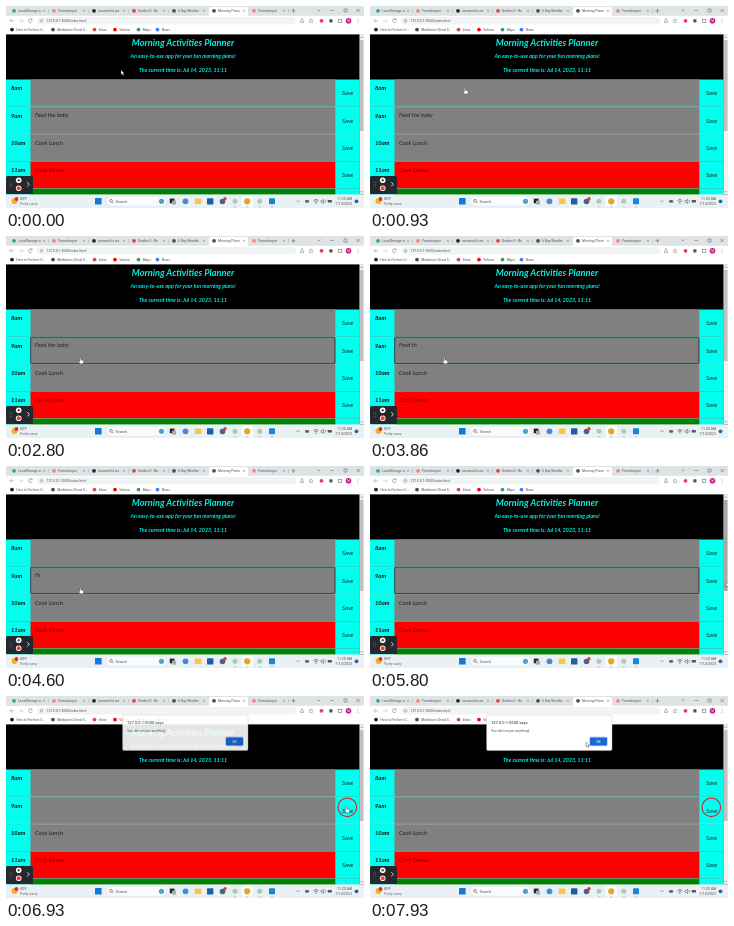
These frames come from a looping animation (358 px wide and 202 px high, 8000 ms). An HTML page:

```html
<!DOCTYPE html>
<html lang="en">
<head>
<meta charset="utf-8">
<title>Morning planner</title>
<style>
  html, body { margin: 0; width: 100%; height: 100%; overflow: hidden; background: #000; }
  svg { display: block; width: 100%; height: 100%; }
  text { font-family: Roboto, "Open Sans", sans-serif; font-size: 3.4px; fill: #555; white-space: pre; }
  .hand { font-family: Lato, sans-serif; font-style: italic; font-size: 5.8px; fill: #222; }
  .bold { font-weight: 700; fill: #111; }
  .head { font-weight: 700; fill: #00f0e2; text-anchor: middle; }
</style>
</head>
<body>
<svg id="stage" viewBox="0 0 358 202"></svg>
<script>
const NS = 'http://www.w3.org/2000/svg';
const LOOP = 8000;
const stage = document.getElementById('stage');
const CYAN = '#00ffee';
const GREY = '#808080';

function add(tag, attrs, parent = stage) {
  const el = document.createElementNS(NS, tag);
  for (const key in attrs) el.setAttribute(key, attrs[key]);
  parent.appendChild(el);
  return el;
}
const rect = (x, y, width, height, fill, more, parent) =>
  add('rect', { x, y, width, height, fill, ...more }, parent);
const dot = (cx, cy, r, fill, more, parent) =>
  add('circle', { cx, cy, r, fill, ...more }, parent);
const line = (d, stroke = '#444', width = 0.6, parent) =>
  add('path', { d, stroke, 'stroke-width': width, fill: 'none' }, parent);
function label(x, y, str, more, parent) {
  const el = add('text', { x, y, ...more }, parent);
  el.textContent = str;
  return el;
}

function drawBrowser() {
  rect(0, 0, 358, 10, '#dee3e5');
  const tabs = [
    ['LocalStorage a', '#2aa79b'], ['Framelooper', '#ff8274'],
    ['norvanel/a we', '#24292f'], ['Grades II - Bo', '#e0463e'],
    ['6 Day Weathe', '#4a4f55'], ['Morning Plann', '#4a4f55'],
    ['Framelooper', '#ff8274']
  ];
  tabs.forEach(([name, color], i) => {
    const x = 4 + i * 40;
    if (i === 5) rect(x - 1, 1, 39, 10, '#fff', { rx: 2 });
    else if (i !== 4) line(`M${x + 38.5} 3v4`, '#9aa5a8', 0.4);
    dot(x + 4, 4.8, 1.9, color);
    label(x + 8, 6, name);
    line(`M${x + 33} 3.8l1.9 1.9m0 -1.9l-1.9 1.9`, '#666', 0.45);
  });
  line('M285.5 4.8h4m-2 -2v4', '#666');
  line('M311.5 3.5l1.5 1.5l1.5 -1.5M324.5 4.5h3.5M350.5 2.8l3.4 3.4m0 -3.4l-3.4 3.4', '#555', 0.5);
  line('M338 3h3v3h-3z', '#555', 0.5);

  rect(0, 9.8, 358, 19, '#fff');
  line('M8 14.8h-4l1.6 -1.7m-1.6 1.7l1.6 1.7', '#888', 0.5);
  line('M13 14.8h4l-1.6 -1.7m1.6 1.7l-1.6 1.7', '#bbb', 0.5);
  line('M26 13.6a1.9 1.9 0 1 0 .2 1.8m-.1 -2.8v1.3h-1.4', '#666', 0.5);
  rect(31, 11, 259, 7.6, '#f1f3f4', { rx: 3.8 });
  dot(35.5, 14.8, 1.3, 'none', { stroke: '#666', 'stroke-width': 0.5 });
  label(40.5, 16, '127.0.0.1:5500/index.html');
  line('M294.5 14.5v2h3v-2m-1.5 1v-3m-1 1l1 -1l1 1', '#666', 0.45);
  line('M305 12.8l.6 1.3l1.5 .2l-1.1 1l.3 1.5l-1.3 -.7l-1.3 .7l.3 -1.5l-1.1 -1l1.5 -.2z', '#666', 0.4);
  dot(315.5, 14.8, 1.9, '#e8404f');
  rect(323.3, 13.2, 3.2, 3.2, '#555', { rx: 0.6 });
  rect(332.5, 13.2, 3.4, 3.2, 'none', { stroke: '#555', 'stroke-width': 0.5 });
  dot(342.5, 14.8, 2.8, '#c2187c');
  label(342.5, 16, 'M', { 'text-anchor': 'middle', style: 'font-size:3px;fill:#fff' });
  [13.2, 14.8, 16.4].forEach(y => dot(352, y, 0.4, '#555'));

  const marks = [
    [6, 'How to Perform U…', '#222'], [47, 'Markdown Cheat S…', '#3b4f66'],
    [88.5, 'Inbox', '#e24a3b'], [109, 'Vidorra', '#f00'],
    [132.5, 'Maps', '#37a455'], [151.5, 'News', '#4a7fe8']
  ];
  marks.forEach(([x, name, color]) => {
    dot(x, 23.6, 1.9, color);
    label(x + 4.2, 24.9, name, { style: 'font-size:3.3px' });
  });
}

const ROW_TOP = 73.5;
const ROW_STEP = 27.3;
const rows = [
  ['8am', '', GREY], ['9am', 'Feed the baby', GREY],
  ['10am', 'Cook Lunch', GREY], ['11am', 'Cook Dinner', '#f00'],
  ['', '', '#008000']
];
const notes = [];

function drawPage() {
  rect(0, 28.5, 353.5, 160, '#000');
  label(177, 39.5, 'Morning Activities Planner', { class: 'hand head', style: 'font-size:9.2px' });
  label(177, 51.8, 'An easy-to-use app for your fun morning plans!', { class: 'hand head', style: 'font-size:5.35px' });
  label(177, 66.4, 'The current time is: Jul 14, 2023, 11:11', { class: 'hand head', style: 'font-size:5.3px' });

  rows.forEach(([hour, note, color], i) => {
    const y = ROW_TOP + i * ROW_STEP;
    rect(0, y, 353.5, ROW_STEP, CYAN);
    rect(24.5, y, 304.8, ROW_STEP, color);
    if (i > 0) line(`M0 ${y}h353.5`, 'rgba(255,255,255,.4)', 0.5);
    label(5, y + 10.8, hour, { class: 'hand bold' });
    notes.push(label(29, y + 10.5, note, { class: 'hand', style: color === GREY ? '' : 'fill:#7a0000' }));
    label(341.7, y + 15.8, 'Save', { class: 'hand', 'text-anchor': 'middle' });
  });

  rect(353.5, 28.5, 4.5, 160, '#f1f1f1');
  line('M354.6 32l1.2 -1.4l1.2 1.4M354.6 185l1.2 1.4l1.2 -1.4', '#777', 0.6);
}

function drawRecorder() {
  rect(0, 170, 27, 18.3, '#25282d', { rx: 1.5 });
  [176.2, 178.5, 180.8].forEach(y => { dot(4, y, 0.45, '#888'); dot(5.8, y, 0.45, '#888'); });
  dot(12.7, 174.3, 2.8, '#fff');
  dot(12.7, 174.3, 1.2, '#555');
  dot(12.7, 182.2, 2.8, '#fff');
  dot(12.7, 182.2, 2, '#f0392e');
  line('M21.3 176.2l2 2.1l-2 2.1', '#fff', 0.8);
}

function drawTaskbar() {
  rect(0, 188.4, 358, 13.6, '#eaf1f5');
  dot(8.5, 195, 3, '#f3b02d');
  dot(10.5, 193, 1.9, '#d93025');
  label(14, 194.4, '80°F');
  label(14, 198.9, 'Partly sunny', { style: 'font-size:3.2px;fill:#666' });
  rect(89, 192, 6.6, 6.6, '#1479d4', { rx: 0.5 });
  rect(100.5, 190.6, 60, 9.4, '#f9fbfd', { rx: 4.7, stroke: '#d5dde4', 'stroke-width': 0.3 });
  dot(105, 194.8, 1.4, 'none', { stroke: '#333', 'stroke-width': 0.5 });
  line('M106.1 196l1.3 1.3', '#333', 0.5);
  label(109.5, 196.6, 'Search', { style: 'font-size:3.8px' });
  dot(155.5, 195.3, 2.6, '#43a7cf');
  rect(163.8, 192.6, 4.7, 4.7, '#222');
  rect(166, 194.6, 4, 4, '#aaa');
  dot(179.5, 195.3, 2.9, '#3c8de0');
  rect(188.8, 192.5, 6.6, 5.5, '#f6c644', { rx: 0.6 });
  rect(201, 192.2, 6.4, 6.2, '#1d5fa6', { rx: 0.7 });
  dot(216.5, 195.5, 2.8, '#48657a');
  dot(219, 192.7, 1.7, '#e23b3b');
  dot(229, 195.3, 2.5, '#a9cdb0');
  rect(235.5, 189.5, 11.5, 11.5, '#f8fbfd', { rx: 1.3 });
  dot(241.2, 195.3, 3.1, '#e5a72a');
  dot(253.7, 195.3, 2.5, '#a9cdb0');
  rect(263, 192.2, 6, 6, '#1688d4', { rx: 0.8 });
  [229, 241.2, 253.7, 266].forEach(x => line(`M${x - 1.3} 200.8h2.6`, '#8a96a0', 0.5));
  line('M290.5 196l1.5 -1.5l1.5 1.5', '#444', 0.5);
  rect(299, 194, 4.2, 2.7, '#666', { rx: 1.3 });
  line('M307.5 194.5q2.4 -2.2 4.8 0m-3.8 1.3q1.4 -1.2 2.8 0', '#333', 0.6);
  dot(309.9, 197, 0.6, '#333');
  line('M315 194.5h1.2l1.4 -1.2v4.2l-1.4 -1.2h-1.2zM319 194q1 1.3 0 2.6', '#333', 0.45);
  rect(321.7, 194, 4.2, 2.5, '#555', { rx: 0.4 });
  label(346, 194.3, '11:20 AM', { 'text-anchor': 'end', style: 'font-size:3.5px' });
  label(346, 199, '7/14/2023', { 'text-anchor': 'end', style: 'font-size:3.5px' });
  dot(350.5, 195.3, 1.9, '#2467ad');
}

drawBrowser();
drawPage();
const thumb = rect(354, 34, 3.5, 91, '#c1c1c1');
const focus = rect(24.7, 101.2, 304.2, 26.4, 'none', { stroke: '#1c1c1c', 'stroke-width': 0.7, rx: 0.8 });
drawRecorder();
drawTaskbar();

const dialog = add('g', {});
rect(116.6, 19, 125.4, 35.6, '#fff', { rx: 1.6, stroke: '#bbb', 'stroke-width': 0.4 }, dialog);
label(121, 27.8, '127.0.0.1:5500 says', { style: 'font-size:4.1px;fill:#222' }, dialog);
label(121, 35.6, 'You did not put anything!', { style: 'font-size:3.5px' }, dialog);
rect(219.2, 40.6, 18.6, 9.6, '#b9d4fb', { rx: 1.7 }, dialog);
rect(220, 41.4, 17, 8, '#1a68d8', { rx: 1.2 }, dialog);
label(228.5, 46.7, 'OK', { 'text-anchor': 'middle', style: 'font-size:3.6px;fill:#fff' }, dialog);

const ring = dot(0, 0, 9.3, 'none', { stroke: '#d3202c', 'stroke-width': 1.1 });
const cursor = add('g', {});
const arrow = add('path', {
  d: 'M0 0v4.8l1.1 -1l.8 1.8l.9 -.4l-.8 -1.7h1.5z',
  fill: '#fff', stroke: '#222', 'stroke-width': 0.35
}, cursor);
const pointer = add('path', {
  d: 'M-.6 0q.6 -.7 1.2 0v2l2.2 .6q.6 .3 .4 1.2l-.5 2h-3.1l-1.7 -2.4q.2 -.9 1.5 0z',
  fill: '#fff', stroke: '#222', 'stroke-width': 0.35
}, cursor);

// time, x, y
const path = [
  [0, 115, 64], [500, 115, 64], [1500, 64.5, 110], [2060, 64.5, 110],
  [2450, 74.5, 122], [5000, 74.5, 122], [5750, 356, 116], [6000, 356, 116],
  [6500, 340.5, 111], [7200, 340.5, 111], [7860, 216, 46], [LOOP, 216, 46]
];
const clamp = v => Math.max(0, Math.min(1, v));
const ease = v => v * v * (3 - 2 * v);
const show = (el, on) => el.setAttribute('visibility', on ? 'visible' : 'hidden');

function cursorAt(t) {
  const i = path.findIndex(p => p[0] > t);
  const [t0, x0, y0] = path[i - 1];
  const [t1, x1, y1] = path[i];
  const k = ease((t - t0) / (t1 - t0));
  return [x0 + (x1 - x0) * k, y0 + (y1 - y0) * k];
}

function draw(t) {
  const [x, y] = cursorAt(t);
  cursor.setAttribute('transform', `translate(${x} ${y})`);
  const overRow = x < 353 && y > ROW_TOP;
  show(arrow, !overRow);
  show(pointer, overRow);
  thumb.setAttribute('fill', x > 353 ? '#a8a8a8' : '#c1c1c1');

  const note = rows[1][1];
  const erased = Math.max(0, Math.floor((t - 2900) / 150));
  notes[1].textContent = note.slice(0, Math.max(0, note.length - erased));

  const firstClick = t >= 1680 && t < 2060;
  const secondClick = t >= 6750;
  show(focus, t >= 1700 && t < 6750);
  show(ring, firstClick || secondClick);
  ring.setAttribute('cx', secondClick ? 341.3 : 65.7);
  ring.setAttribute('cy', secondClick ? 111.3 : 112.8);
  dialog.setAttribute('opacity', clamp((t - 6850) / 90));
}

function tick(now) {
  draw(now % LOOP);
  requestAnimationFrame(tick);
}
draw(0);
requestAnimationFrame(tick);
</script>
</body>
</html>
```
